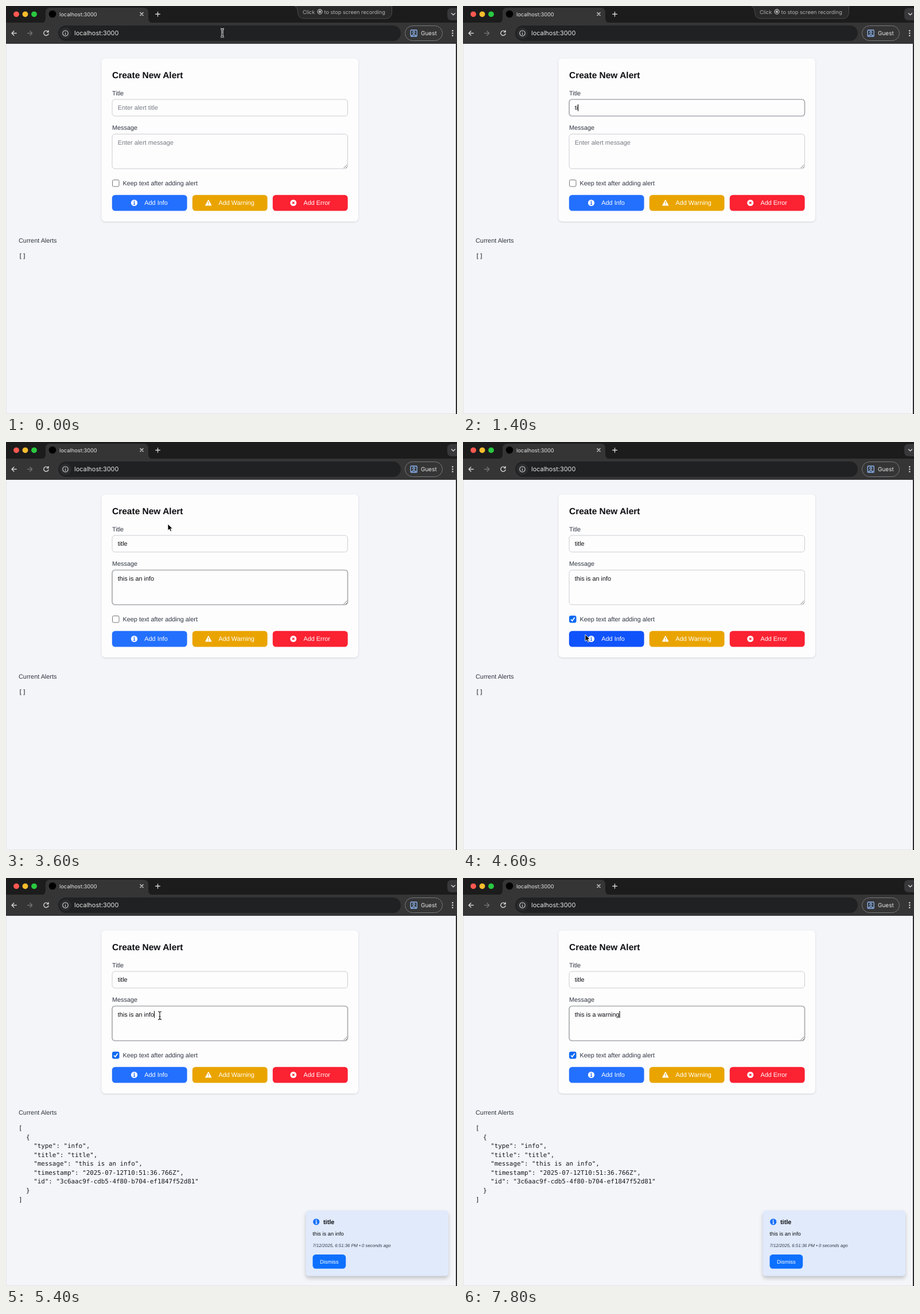
Write an HTML page that moves like this. It is 786 by 712 pixels and loops after 8000 ms.

```html
<!DOCTYPE html>
<html lang="en">
<head>
<meta charset="utf-8">
<title>Alert form</title>
<style>
  html, body { margin: 0; width: 100%; height: 100%; overflow: hidden; background: #f4f5f9; }
  svg { display: block; width: 786px; height: 712px; }
  text { font: 10.87px "Liberation Sans", Arial, sans-serif; text-rendering: geometricPrecision; white-space: pre; fill: #0c0d10; }
  .ui text { font-family: Inter, sans-serif; fill: #e6e6e6; }
  .label { fill: #2f3540; }
  .hint { fill: #767a82; }
  .white, .buttons text { fill: #fff; }
  .mono text { font-family: "DejaVu Sans Mono", monospace; fill: #15181d; }
  .line { fill: none; stroke: #d4d4d4; stroke-width: 1.4; stroke-linecap: round; stroke-linejoin: round; }
  .field { fill: #fdfdfe; stroke: #cccdd1; }
  .field.focus { stroke: #a9abae; stroke-width: 1.7; }
  .card { filter: drop-shadow(0 1px 1.5px #0002); }
  #toast .box { filter: drop-shadow(0 4px 3px #0003); }
</style>
</head>
<body>
<svg viewBox="0 0 786 712">
  <defs>
    <g id="infoIcon"><circle r="5.6"/><path d="M-1.2 -.6H.3V2.8M-1.4 2.8H1.6" fill="none" stroke="var(--mark)" stroke-width="1.2"/><circle cy="-2.8" r=".9" fill="var(--mark)"/></g>
  </defs>

  <rect width="786" height="712" fill="#f4f5f9"/>

  <g class="ui">
    <rect width="786" height="30" fill="#1c1c1d"/>
    <path d="M60 30Q69 30 69 21V11Q69 3 77 3H240Q248 3 248 11V21Q248 30 257 30Z" fill="#353536"/>
    <rect y="29" width="786" height="37" fill="#353536"/>
    <circle cx="18" cy="14.3" r="4.9" fill="#fe5850"/>
    <circle cx="33.5" cy="14.3" r="4.9" fill="#f8bc2d"/>
    <circle cx="49" cy="14.3" r="4.9" fill="#29c940"/>
    <circle cx="81" cy="14" r="6.3" fill="#000"/>
    <text x="93" y="17.5" style="font-size:9.3px">localhost:3000</text>
    <path class="line" d="M234 11.5l5 5m0-5l-5 5M260.7 14.2h7.6M264.5 10.4v7.6"/>
    <rect x="769" y="3.5" width="25" height="21.5" rx="7" fill="#38383a"/>
    <path class="line" d="M776.5 12.8l3 3 3-3"/>
    <path class="line" d="M18.2 47.5H10m3.8-3.8L10 47.5l3.8 3.8"/>
    <path class="line" d="M37.5 47.5h8.2m-3.8-3.8l3.8 3.8-3.8 3.8" style="stroke:#747474"/>
    <path class="line" d="M73.5 45A4.2 4.2 0 1 0 74 48.5M74 42.8v2.8h-2.8"/>
    <rect x="91" y="34" width="597" height="27" rx="13.5" fill="#202122"/>
    <circle cx="103.5" cy="47.5" r="10" fill="#2b2c2d"/>
    <circle class="line" cx="103.5" cy="47.5" r="4.7" style="stroke-width:1.1"/>
    <path class="line" d="M103.5 47.3v2.5M103.5 45v.1" style="stroke-width:1.2"/>
    <text x="119" y="51.4" style="font-size:10.95px">localhost:3000</text>
    <rect x="695.5" y="34.5" width="65" height="26" rx="13" fill="none" stroke="#77787a"/>
    <g fill="none" stroke="#8fb8f6" stroke-width="1.3"><rect x="705.2" y="42" width="11" height="11" rx="1.2"/><circle cx="710.7" cy="46" r="1.8"/><path d="M706.5 52Q710.7 48 715 52"/></g>
    <text x="723" y="51" style="font-size:10px">Guest</text>
    <g fill="#d4d4d4"><circle cx="778.3" cy="43.2" r="1.3"/><circle cx="778.3" cy="47.5" r="1.3"/><circle cx="778.3" cy="51.8" r="1.3"/></g>
    <g id="tip">
      <path d="M502.500 0Q508 2 508.500 10Q508.500 22 520 22H661Q672.500 22 672.500 10V0Z" fill="#29292a" stroke="#4b4b4c"/>
      <g style="opacity:.72">
        <text x="517" y="13.500" style="font-size:9.15px">Click</text>
        <circle cx="547" cy="10" r="4" fill="none" stroke="#e6e6e6" stroke-width="1.3"/>
        <rect x="545" y="8" width="4" height="4" rx="1" fill="#e6e6e6"/>
        <text x="554.500" y="13.500" style="font-size:9.200px">to stop screen recording</text>
      </g>
    </g>
  </g>
  <path d="M785 66V712" stroke="#29292b" stroke-width="2"/>
  <path d="M.5 66V712M0 711.500H784" stroke="#e0e1e5" stroke-width=".8"/>

  <rect class="card" x="166.500" y="91.500" width="447.500" height="284.500" rx="6.500" fill="#fdfdfe"/>
  <text x="185" y="126.300" style="font-size:15.5px;font-weight:bold">Create New Alert</text>
  <text class="label" x="185" y="155.500">Title</text>
  <rect class="field" id="titleBox" x="185" y="163" width="410.500" height="29" rx="5"/>
  <text id="title" x="194.700" y="181.300"></text>
  <text class="label" x="185" y="216.200">Message</text>
  <rect class="field" id="messageBox" x="185" y="223.500" width="410.500" height="60.500" rx="5"/>
  <path d="M588.500 283l6-6M592 283l2.500-2.500" stroke="#666" stroke-width=".9"/>
  <text id="message" x="194.700" y="242"></text>
  <path id="caret" stroke="#000"/>

  <rect id="check" x="185.500" y="303.500" width="11.500" height="11.500" rx="2"/>
  <path id="tick" d="M188 309.500l2.400 2.500 4.200-5.800" fill="none" stroke="#fff" stroke-width="1.800"/>
  <text class="label" x="203.500" y="313">Keep text after adding alert</text>

  <g class="buttons">
    <rect id="infoButton" x="184.800" y="329.700" width="130.800" height="27.800" rx="5.500"/>
    <rect x="324.800" y="329.700" width="130.800" height="27.800" rx="5.500" fill="#eaa400"/>
    <rect x="464.800" y="329.700" width="130.800" height="27.800" rx="5.500" fill="#fb2232"/>
    <use href="#infoIcon" x="223.500" y="343.500" fill="#fff" style="--mark:#1f68f5"/>
    <path d="M352.800 338.800l5 9.200h-10z" fill="#fff" stroke="#fff" stroke-width="1.200" stroke-linejoin="round"/>
    <path d="M352.800 341.300v3.400M352.800 346v1.300" stroke="#eaa400" stroke-width="1.200"/>
    <circle cx="500.800" cy="343.500" r="5.500" fill="#fff"/>
    <path d="M499 341.700l3.600 3.600m0-3.600l-3.600 3.600" stroke="#fb2232" stroke-width="1.300"/>
    <text x="241.300" y="347.300">Add Info</text>
    <text x="370.500" y="347.300">Add Warning</text>
    <text x="518.500" y="347.300">Add Error</text>
  </g>

  <text class="label" x="22" y="412.500">Current Alerts</text>
  <g class="mono" id="json"></g>

  <g id="toast">
    <rect class="box" x="522.500" y="580" width="248.500" height="114.500" rx="5.500" fill="#e0eafb"/>
    <use href="#infoIcon" x="540.700" y="600" fill="#1670fb" style="--mark:#fff"/>
    <text x="553" y="604" style="font-weight:bold">title</text>
    <text x="534.500" y="623.500" style="font-size:9.310px">this is an info</text>
    <text id="stamp" x="534.500" style="font-size:7.770px;font-style:italic">7/12/2025, 6:51:36 PM • 0 seconds ago</text>
    <rect x="534.500" y="657" width="57.700" height="24.800" rx="5.500" fill="#0d70ff"/>
    <text class="white" x="547" y="672.500" style="font-size:9.310px">Dismiss</text>
  </g>

  <g id="mouse">
    <path id="arrow" d="M0 0V11.500L2.700 9 4.600 13.200 6.600 12.300 4.800 8.300H8.400Z" fill="#000" stroke="#fff" stroke-width=".9"/>
    <g id="beam" fill="none">
      <path id="beamShape" d="M-3 -7Q0 -7 0 -5Q0 -7 3 -7M0 -5V5M-3 7Q0 7 0 5Q0 7 3 7M-1.500 2H1.500" stroke="#fff" stroke-width="2.600"/>
      <use href="#beamShape"/>
      <path d="M-3 -7Q0 -7 0 -5Q0 -7 3 -7M0 -5V5M-3 7Q0 7 0 5Q0 7 3 7M-1.500 2H1.500" stroke="#111" stroke-width="1.100"/>
    </g>
  </g>
</svg>
<script>
const LOOP = 8000, TICK = 200;
const $ = id => document.getElementById(id);

// Each track lists [start in ms, value]; a value holds until the next entry.
const titleTrack = [[0, ''], [1200, 't'], [1400, 'ti'], [1600, 'titl'], [1800, 'title']];
const messageTrack = [
  [0, ''], [2200, 'th'], [2400, 'this i'], [2600, 'this is a'], [2800, 'this is an i'], [3000, 'this is an info'],
  [5800, 'this is an inf'], [6400, 'this is an'], [6600, 'this is a'], [6800, 'this is a '],
  [7000, 'this is a w'], [7200, 'this is a war'], [7400, 'this is a warn'], [7600, 'this is a warnin'], [7800, 'this is a warning']
];
const focusTrack = [[0, ''], [800, 'title'], [2000, 'message'], [4200, ''], [5400, 'message']];
const caretTrack = [[0, true], [3600, false], [5400, true]];
const mousePaths = [
  [[0, 377, 47], [200, 377, 47], [400, 362, 96], [600, 340, 160], [800, 333, 178], [1000, 333, 178]],
  [[3600, 282, 143], [3800, 246, 208], [4000, 198, 292], [4200, 191, 308], [4400, 207, 331], [4600, 213, 336],
   [4800, 213, 336], [5000, 222, 312], [5200, 258, 250], [5400, 268, 240], [5600, 268, 240]]
];

const JSON_LINES = JSON.stringify([{
  type: 'info', title: 'title', message: 'this is an info',
  timestamp: '2025-07-12T10:51:36.766Z', id: '3c6aac9f-cdb5-4f80-b704-ef1847f52d81'
}], null, 2).split('\n');

const valueAt = (track, t) => track.findLast(([start]) => start <= t)[1];
const show = (id, visible) => $(id).style.display = visible ? '' : 'none';

function mouseAt(t) {
  const path = mousePaths.find(p => t >= p[0][0] && t <= p.at(-1)[0]);
  if (!path) return null;
  const i = path.findLastIndex(p => p[0] <= t);
  const [t0, x0, y0] = path[i], [t1, x1, y1] = path[i + 1] || path[i];
  const k = t1 > t0 ? (t - t0) / (t1 - t0) : 0;
  return [x0 + (x1 - x0) * k, y0 + (y1 - y0) * k];
}

const inside = ([x, y], left, top, right, bottom) => x >= left && x <= right && y >= top && y <= bottom;

function drawField(id, value, hint, focused) {
  $(id).textContent = value || hint;
  $(id).setAttribute('class', value ? '' : 'hint');
  $(id + 'Box').setAttribute('class', focused ? 'field focus' : 'field');
}

function drawCaret(focus, text, visible) {
  show('caret', focus && visible);
  if (!focus) return;
  const x = 195.2 + (text ? $(focus).getComputedTextLength() : 0);
  const y = focus === 'title' ? 171.5 : 232;
  $('caret').setAttribute('d', `M${x} ${y}v12`);
}

function drawMouse(point) {
  show('mouse', point);
  if (!point) return;
  const overText = inside(point, 119, 34, 688, 61) || inside(point, 185, 163, 596, 192) || inside(point, 185, 223, 596, 284);
  show('beam', overText);
  show('arrow', !overText);
  $('mouse').setAttribute('transform', `translate(${point})`);
}

function drawAlert(t) {
  const added = t >= 4800, settling = t < 5000;
  const lines = added ? JSON_LINES : ['[]'];
  $('json').innerHTML = lines.map((s, i) => `<text x="22" y="${440 + i * 15.58}">${s}</text>`).join('');
  show('toast', added);
  $('toast').setAttribute('transform', `translate(0 ${settling ? 0.5 : 0})`);
  $('stamp').setAttribute('y', settling ? 651.7 : 644.2);
  $('stamp').style.fill = settling ? '#98a0ad' : '#333944';
}

function draw(time) {
  const t = Math.floor(time % LOOP / TICK) * TICK;
  const title = valueAt(titleTrack, t), message = valueAt(messageTrack, t), focus = valueAt(focusTrack, t);
  const mouse = mouseAt(t), checked = t >= 4200;

  drawField('title', title, 'Enter alert title', focus === 'title');
  drawField('message', message, 'Enter alert message', focus === 'message');
  drawCaret(focus, focus === 'title' ? title : message, valueAt(caretTrack, t));
  drawMouse(mouse);
  drawAlert(t);

  show('tip', t < 2000);
  show('tick', checked);
  $('check').setAttribute('fill', checked ? '#0b69f2' : '#fff');
  $('check').setAttribute('stroke', checked ? '#0b69f2' : '#777');
  const hover = mouse && inside(mouse, 185, 330, 315, 357);
  $('infoButton').setAttribute('fill', hover ? '#1053fb' : '#2370ff');
}

const start = performance.now();
function frame() {
  draw(performance.now() - start);
  requestAnimationFrame(frame);
}
frame();
</script>
</body>
</html>
```
